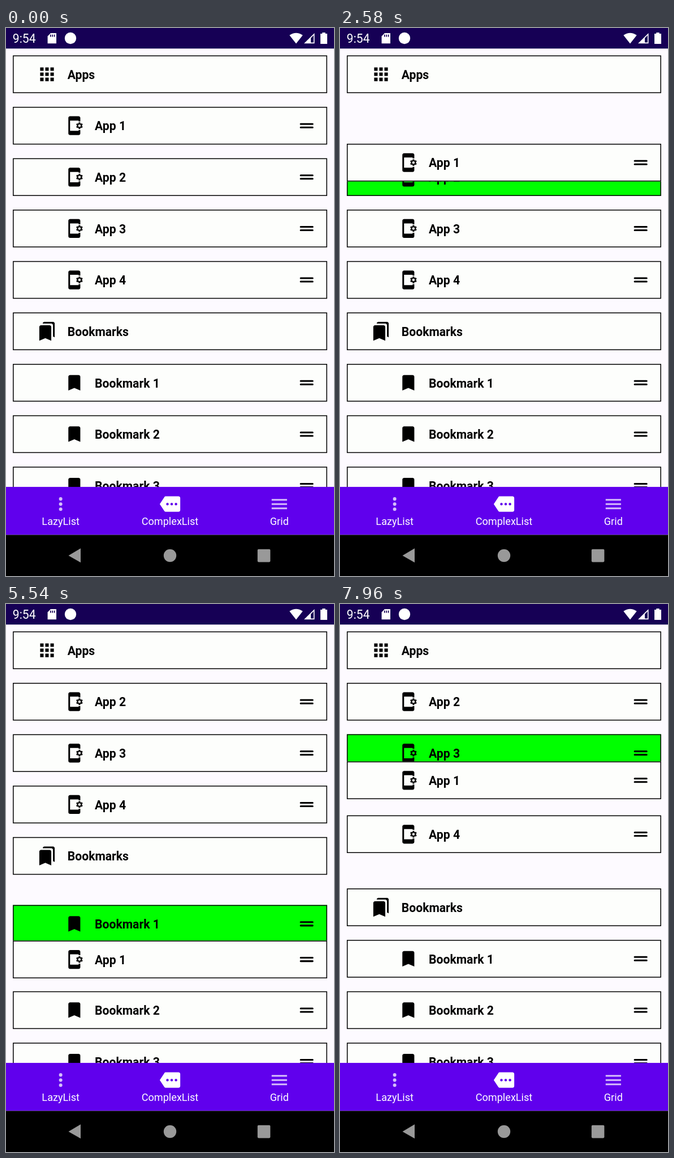
An HTML page with a canvas for the animation above (8 s loop, 580 by 966 pixels).

```html
<!DOCTYPE html>
<html lang="en">
<head>
<meta charset="utf-8">
<title>Reorderable list</title>
<style>
  html, body { margin: 0; width: 100%; height: 100%; overflow: hidden; background: #000; }
  canvas { display: block; width: 580px; height: 966px; }
</style>
</head>
<body>
<canvas id="stage"></canvas>
<script>
const W = 580, H = 966, LOOP = 8000;
const DP = W / 384;
const PITCH = 60 * DP, CARD_H = 44 * DP, CARD_X = 8 * DP, CARD_W = 368 * DP;
const BAR_H = 24 * DP, TABS_Y = H - 104 * DP, NAV_Y = H - 48 * DP;
const FIRST_Y = BAR_H + 8 * DP;
const PAGE = '#fdfaff', CARD = '#fdfefc', HOVER = '#00ff00';
const BAR = '#160055', PURPLE = '#6000ed', GREY = '#999';

const canvas = document.getElementById('stage');
const ctx = canvas.getContext('2d');
const ratio = window.devicePixelRatio || 1;
canvas.width = W * ratio;
canvas.height = H * ratio;

// Icons live on a 24 x 24 grid.
const ICONS = {
  apps: gridIcon(),
  app: phoneIcon(),
  bookmark: new Path2D('M17 3H7c-1.1 0-2 .9-2 2v16l7-3 7 3V5c0-1.1-.9-2-2-2z'),
  bookmarks: new Path2D('M19 18l2 1V3c0-1.1-.9-2-2-2H9C7.9 1 7 1.9 7 3h10c1.1 0 2 .9 2 2z' +
    'M15 5H5c-1.1 0-2 .9-2 2v16l7-3 7 3V7c0-1.1-.9-2-2-2z'),
  handle: new Path2D('M5 9h14a1 1 0 0 1 0 2H5a1 1 0 0 1 0-2zM5 13h14a1 1 0 0 1 0 2H5a1 1 0 0 1 0-2z'),
  menu: new Path2D('M3 6h18v2H3zM3 11h18v2H3zM3 16h18v2H3z'),
  dots: dotsIcon([[12, 6], [12, 12], [12, 18]], 2),
  tag: tagIcon()
};

function addDots(path, points, r) {
  for (const [x, y] of points) {
    path.moveTo(x + r, y);
    path.arc(x, y, r, 0, 2 * Math.PI);
  }
  return path;
}

function dotsIcon(points, r) {
  return addDots(new Path2D(), points, r);
}

function tagIcon() {
  const path = new Path2D('M22 3H7c-.7 0-1.2.35-1.6.9L0 12l5.4 8.1c.4.55 1 .9 1.7.9H22c1.1 0 2-.9 2-2V5c0-1.1-.9-2-2-2z');
  return addDots(path, [[9, 12], [14, 12], [19, 12]], 1.5);
}

function gridIcon() {
  const path = new Path2D();
  for (let i = 0; i < 9; i++) path.rect(4 + i % 3 * 6, 4 + Math.floor(i / 3) * 6, 4, 4);
  return path;
}

function phoneIcon() {
  const path = new Path2D('M17 18H7V6h10v1h2V3c0-1.1-.9-2-2-2H7c-1.1 0-2 .9-2 2v18c0 1.1.9 2 2 2h10c1.1 0 2-.9 2-2v-4h-2z');
  const gear = (r, a) => [18 + r * Math.sin(a), 12 + r * Math.cos(a)];
  for (let i = 0; i < 6; i++) {
    const a = i * Math.PI / 3;
    const corners = [[2.95, -.38], [4, -.24], [4, .24], [2.95, .38]];
    corners.forEach(([r, da], k) => path[i + k ? 'lineTo' : 'moveTo'](...gear(r, a + da)));
  }
  path.closePath();
  return addDots(path, [[18, 12]], 1.5);
}

const ITEMS = [
  { text: 'Apps', icon: 'apps', fixed: true },
  ...[1, 2, 3, 4].map(n => ({ text: 'App ' + n, icon: 'app' })),
  { text: 'Bookmarks', icon: 'bookmarks', fixed: true },
  ...[1, 2, 3].map(n => ({ text: 'Bookmark ' + n, icon: 'bookmark' }))
];
const DRAGGED = 1;

const slotY = slot => FIRST_Y + slot * PITCH;

// Finger path: [time, top of the dragged card]
const DRAG = [
  [2000, slotY(1)], [2580, 203.9], [4130, 411], [4330, 443], [5440, 592.4], [5560, 593.4],
  [5700, 591.5], [6140, 500], [6540, 481], [7860, 321], [7960, 278], [8000, 262]
];

// Monotone cubic through the finger path.
const rates = DRAG.slice(1).map((p, i) => (p[1] - DRAG[i][1]) / (p[0] - DRAG[i][0]));
const slopes = DRAG.map((p, i) => {
  const a = rates[i - 1], b = rates[i];
  if (a === undefined) return 0;
  if (b === undefined) return a;
  return a * b > 0 ? 2 * a * b / (a + b) : 0;
});

function dragY(t) {
  if (t <= DRAG[0][0]) return DRAG[0][1];
  let i = 0;
  while (i < DRAG.length - 2 && t > DRAG[i + 1][0]) i++;
  const [t0, y0] = DRAG[i], [t1, y1] = DRAG[i + 1];
  const span = t1 - t0, u = (t - t0) / span, v = 1 - u;
  return v * v * ((1 + 2 * u) * y0 + u * span * slopes[i]) +
    u * u * ((3 - 2 * u) * y1 - v * span * slopes[i + 1]);
}

// A neighbour gives way once the dragged card reaches its slot.
function findSwaps() {
  const order = ITEMS.map((_, i) => i), swaps = [];
  let slot = DRAGGED;
  for (let t = 0; t < LOOP; t += 4) {
    const y = dragY(t);
    const step = y >= slotY(slot + 1) ? 1 : y <= slotY(slot - 1) ? -1 : 0;
    if (!step) continue;
    const item = order[slot + step];
    swaps.push({ t, item, from: slot + step, to: slot });
    order[slot] = item;
    slot += step;
    order[slot] = DRAGGED;
  }
  return swaps;
}
const SWAPS = findSwaps();

// Critically damped spring, stiffness 400.
function spring(ms) {
  const x = ms * 0.02;
  return 1 - (1 + x) * Math.exp(-x);
}

function itemY(i, t) {
  if (i === DRAGGED) return dragY(t);
  const last = SWAPS.filter(s => s.item === i && s.t <= t).pop();
  if (!last) return slotY(i);
  return slotY(last.from + (last.to - last.from) * spring(t - last.t));
}

function rect(x, y, w, h, color) {
  ctx.fillStyle = color;
  ctx.fillRect(x, y, w, h);
}

function shape(points, color) {
  ctx.beginPath();
  points.forEach(p => ctx.lineTo(...p));
  ctx.closePath();
  ctx.fillStyle = color;
  ctx.fill();
}

function disc(x, y, r, color) {
  ctx.beginPath();
  ctx.arc(x, y, r, 0, 2 * Math.PI);
  ctx.fillStyle = color;
  ctx.fill();
}

function icon(name, cx, cy, color) {
  ctx.save();
  ctx.translate(cx, cy);
  ctx.scale(DP, DP);
  ctx.translate(-12, -12);
  ctx.fillStyle = color;
  ctx.fill(ICONS[name], name === 'bookmarks' ? 'nonzero' : 'evenodd');
  ctx.restore();
}

function label(text, x, y, font, color, align = 'left') {
  ctx.font = font + ' Roboto, sans-serif';
  ctx.textAlign = align;
  ctx.fillStyle = color;
  ctx.fillText(text, x, y);
}

function card(item, y, color) {
  const mid = y + CARD_H / 2, indent = item.fixed ? 0 : 32 * DP;
  rect(CARD_X, y, CARD_W, CARD_H, color);
  ctx.strokeStyle = '#000';
  ctx.lineWidth = DP;
  ctx.strokeRect(CARD_X + DP / 2, y + DP / 2, CARD_W - DP, CARD_H - DP);
  icon(item.icon, 48 * DP + indent, mid, '#000');
  label(item.text, 72 * DP + indent, mid + 8.2, '700 21.15px', '#000');
  if (!item.fixed) icon('handle', 352 * DP, mid, '#000');
}

function list(t) {
  ctx.save();
  ctx.beginPath();
  ctx.rect(0, BAR_H, W, TABS_Y - BAR_H);
  ctx.clip();
  const top = dragY(t), active = t >= DRAG[0][0];
  ITEMS.forEach((item, i) => {
    if (i === DRAGGED) return;
    const y = itemY(i, t);
    const hit = active && !item.fixed && Math.abs(y - top) < CARD_H;
    card(item, y, hit ? HOVER : CARD);
  });
  card(ITEMS[DRAGGED], top, CARD);
  ctx.restore();
}

function statusBar() {
  rect(0, 0, W, BAR_H, BAR);
  label('9:54', 11.8, 26.4, '400 21.15px', '#fff');

  shape([[79, 9], [89, 9], [89, 27.3], [73.6, 27.3], [73.6, 14.4]], '#fff');
  for (const x of [78, 81.4, 84.8]) rect(x, 11.6, 1.7, 4, BAR);
  disc(114, 18, 10.2, '#fff');

  ctx.beginPath();
  ctx.moveTo(513, 27.4);
  ctx.lineTo(501.3, 12.8);
  ctx.quadraticCurveTo(513, 4.6, 524.7, 12.8);
  ctx.fillStyle = '#fff';
  ctx.fill();

  shape([[545.5, 9], [545.5, 27.2], [527, 27.2]], '#fff');
  shape([[543.9, 13], [543.9, 25.6], [539, 25.6], [539, 17.8]], BAR);

  rect(556, 10, 12, 18, '#fff');
  rect(559.3, 8, 5.4, 3, '#fff');
}

function tabs() {
  rect(0, TABS_Y, W, NAV_Y - TABS_Y, PURPLE);
  const pale = 'rgba(255,255,255,.74)';
  [['dots', 'LazyList', pale], ['tag', 'ComplexList', '#fff'], ['menu', 'Grid', pale]].forEach(([name, text, color], i) => {
    const x = W * (i + .5) / 3;
    icon(name, x, 839.2, color);
    label(text, x, 875.6, '400 18.12px', '#fff', 'center');
  });
}

function navBar() {
  rect(0, NAV_Y, W, H - NAV_Y, '#000');
  shape([[110.5, 930], [132, 917.3], [132, 942.3]], GREY);
  disc(290, 930, 11.2, GREY);
  ctx.beginPath();
  ctx.roundRect(444.8, 918.8, 22.6, 22.6, 1.8);
  ctx.fill();
}

function draw(t) {
  ctx.setTransform(ratio, 0, 0, ratio, 0, 0);
  rect(0, 0, W, H, PAGE);
  list(t);
  statusBar();
  tabs();
  navBar();
}

const start = performance.now();
function frame() {
  draw((performance.now() - start) % LOOP);
  requestAnimationFrame(frame);
}
frame();
</script>
</body>
</html>
```
